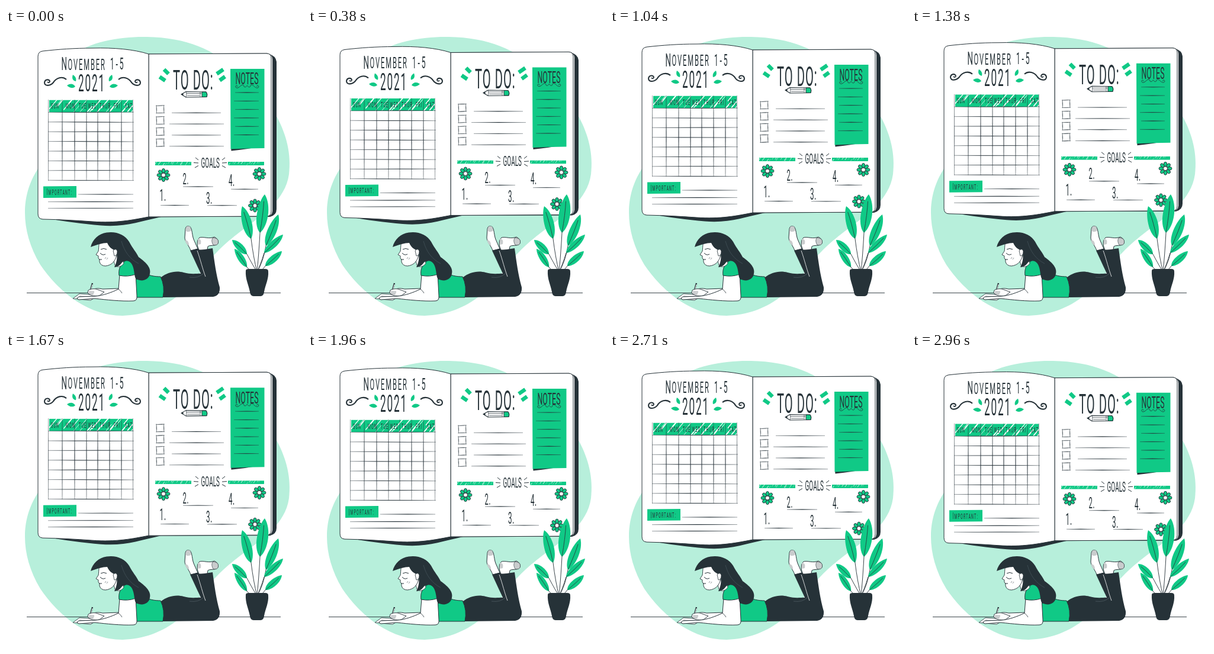
An HTML page with a canvas that plays this animation: 500 px wide and 500 px high, repeating every 3000 ms.

```html
<!DOCTYPE html>
<html lang="en">
<head>
<meta charset="utf-8">
<title>Weekly planner</title>
<style>
html, body { margin: 0; width: 100%; height: 100%; overflow: hidden; background: #fff; }
canvas { display: block; width: 500px; height: 500px; }
</style>
</head>
<body>
<canvas id="stage"></canvas>
<script>
const canvas = document.getElementById('stage');
const ctx = canvas.getContext('2d');
const dpr = window.devicePixelRatio || 1;
canvas.width = canvas.height = 500 * dpr;

const GREEN = '#10c986', PALE = '#b7efdb', DARK = '#263238', WHITE = '#fff', GREY = '#c9cccd';
const LOOP = 3000, LIFT = 10, CONDENSE = 0.43;

function shape(d, fill, stroke, width = 1) {
  const p = new Path2D(d);
  if (fill) { ctx.fillStyle = fill; ctx.fill(p); }
  if (stroke) { ctx.strokeStyle = stroke; ctx.lineWidth = width; ctx.stroke(p); }
}
const line = (d, width = 1, color = DARK) => shape(d, null, color, width);

// Pen line that thins out at both ends
function pen(x1, y1, x2, y2, width = 0.9) {
  const mx = (x1 + x2) / 2, my = (y1 + y2) / 2;
  const a = Math.atan2(y2 - y1, x2 - x1);
  const nx = -Math.sin(a) * width, ny = Math.cos(a) * width;
  shape(`M${x1} ${y1}Q${mx + nx} ${my + ny} ${x2} ${y2}Q${mx - nx} ${my - ny} ${x1} ${y1}`, DARK, DARK, 0.25);
}

// Tall narrow lettering, x and track in stage pixels
function label(str, x, y, size, track = 0) {
  ctx.save();
  ctx.translate(x, y);
  ctx.scale(CONDENSE, 1);
  ctx.font = `400 ${size}px Roboto, "Open Sans", sans-serif`;
  ctx.letterSpacing = track / CONDENSE + 'px';
  ctx.fillStyle = DARK;
  ctx.fillText(str, 0, 0);
  ctx.restore();
}

function mirror(axis, draw) {
  draw();
  ctx.save();
  ctx.translate(2 * axis, 0);
  ctx.scale(-1, 1);
  draw();
  ctx.restore();
}

function randomFrom(seed) {
  return () => (seed = (seed * 16807) % 2147483647) / 2147483647;
}

// Marker block with slanted white gaps
function marker(x, y, w, h, gaps, width, seed) {
  const rnd = randomFrom(seed);
  ctx.save();
  ctx.beginPath();
  ctx.rect(x, y, w, h);
  ctx.clip();
  ctx.fillStyle = GREEN;
  ctx.fillRect(x, y, w, h);
  for (let i = 0; i < gaps; i++) {
    const gx = x + w * (i + rnd() * 0.8) / gaps;
    const gy = y + h * (rnd() < 0.6 ? 0 : 0.5);
    const len = h * (0.4 + rnd() * 0.5);
    line(`M${gx} ${gy + len}L${gx + len * 0.9} ${gy - 1}`, width * (0.5 + rnd()), WHITE);
  }
  ctx.restore();
}

function flower(x, y, r) {
  ctx.save();
  ctx.translate(x, y);
  ctx.strokeStyle = DARK;
  ctx.lineWidth = 0.9;
  for (let i = 0; i < 8; i++) {
    ctx.beginPath();
    ctx.ellipse(0, -r * 0.66, r * 0.25, r * 0.34, 0, 0, 7);
    ctx.fillStyle = GREEN;
    ctx.fill();
    ctx.stroke();
    ctx.rotate(Math.PI / 4);
  }
  ctx.beginPath();
  ctx.arc(0, 0, r * 0.31, 0, 7);
  ctx.fillStyle = WHITE;
  ctx.fill();
  ctx.stroke();
  ctx.restore();
}

function background() {
  shape(`M238 15C305 16 352 37 389 72C424 106 443 125 458 151C474 181 482 213 478 247
    C472 291 431 317 401 340C372 362 354 378 335 404C308 441 270 483 197 486
    C135 486 86 441 58 400C40 370 32 340 32 312C32 280 42 256 55 236
    C78 190 82 82 114 47C139 22 198 14 238 15Z`, PALE);
}

function pages() {
  shape(`M68 321C100 327 130 331 160 333.5C200 337 225 327 262 319L446 319
    Q457 316 457 306V57Q456 47 444 44H250L68 300Z`, DARK);
  shape('M241 44L441 43Q450.5 45 450.5 53V309Q450 318 441 318L241 319Z', WHITE, DARK, 0.8);
  shape('M241 44L440 43Q448 43 448 51V310Q448 318 440 318L241 319Z', WHITE, DARK);
  shape(`M241 44C216 36 182 33 146 34C115 34 89 36 62 39Q54 40 54 48V314
    Q54 322.5 62 323C91 323.5 117 325 146 327C186 330 215 324 241 319Z`, WHITE, DARK);
}

function titles() {
  label('N', 93.5, 71.5, 31);
  label('OVEMBER', 104.5, 71, 26, 1.9);
  label('1-5', 176, 70.5, 28, 2.8);
  label('2021', 122, 107.5, 40, 1.8);
  mirror(146, () => {
    line('M74 91C74 86 66 86 65 92C65 99 75 98 80 92C85 84 95 81 102 87', 2.1);
    line('M70 91Q72 93.5 74 91', 1.8);
    shape('M118 90C112 89 111 84 113 79C118 82 119 86 118 90Z', GREEN);
    shape('M117 99C112 103 107 101 103 97C109 93 114 94 117 99Z', GREEN);
  });
}

function calendar() {
  marker(73, 121.5, 141, 21, 22, 1.2, 71);
  [71.5, 95, 116, 136, 155, 175, 195, 214.5].forEach((x, i) =>
    pen(x, 121, x, 258, i % 7 ? 0.8 : 0.4));
  for (let i = 0; i < 8; i++) {
    const y = 142.4 + i * 16.4;
    pen(71, y, 216, y + (i % 2 ? 0.4 : -0.3), 0.8);
  }
  const days = [['SUN', 76], ['MON', 101], ['TUE', 123], ['WED', 138.5], ['THUR', 158], ['FRI', 182], ['SAT', 201]];
  for (const [day, x] of days) label(day, x, 136.5, 12.5, 1.2);
  shape('M63 267.5L119 267V286.5L63 287Z', GREEN);
  label('I', 68.5, 282.5, 14);
  label('MPORTANT:', 71.5, 282, 12.5, 1.2);
  pen(122, 281, 215, 281);
  pen(71, 293.6, 215, 293.4);
  pen(71, 304.5, 215, 304.3);
}

function pencil() {
  shape('M296 112L304 107.5L338 108Q341 112 339 116.5L304 117Z', WHITE, DARK, 1.1);
  shape('M331 108H338Q341 112 339 116.5H331Z', GREEN, DARK, 1);
  shape('M295.5 112L299.5 110V114.5Z', DARK);
  line('M304 107.5Q306 112 304 117M305 110.5H330M306 114H327M328 108V116.5', 0.7);
}

function todo() {
  label('TO DO:', 282, 104.5, 47, 1);
  line('M267 70L274.5 77.5M259.5 82.5L269 89', 6.5, GREEN);
  line('M367 70L356 77.5M370 82L361 88.5', 6.5, GREEN);
  pencil();
  for (let i = 0; i < 4; i++) {
    const y = 130.8 + i * 18.8;
    pen(253, y + 0.5, 268, y, 0.7);
    pen(254, y - 0.5, 254.5, y + 13.5, 0.7);
    pen(253, y + 13, 268, y + 12.5, 0.7);
    pen(266.5, y - 0.5, 267, y + 13.5, 0.7);
    pen(i % 2 ? 276 : 280, y + 12.5, i % 2 ? 368 : 363, y + 12.5);
  }
}

function notes() {
  shape('M380 200L430 200Q407 205 380.5 207.5Z', DARK);
  shape('M379 69H436.5V203Q407 203 379.5 204.5Z', GREEN);
  label('NOTES', 387.5, 95.5, 28.5, 0.1);
  mirror(407.3, () =>
    line('M391 99C391 96 387 97 388 100C390 103 394 100 396 98C399 95 402 96 402 99C404 101 406 99 407.3 97', 0.8));
  for (let i = 0; i < 6; i++) pen(i % 2 ? 385 : 387, 109 + i * 14.3, 427, 109 + i * 14.3, 0.8);
}

function goals() {
  marker(252, 226, 61, 6, 13, 0.6, 19);
  marker(375, 226, 61, 6, 13, 0.6, 43);
  label('GOALS', 329.5, 236, 23, 0.1);
  mirror(345, () => line('M320 219L325 223M317 227.5L325 228M319 236L325 232.5', 1));
  label('1.', 259.5, 292.5, 28, 0.8);
  label('2.', 298.5, 264.5, 26, 0.8);
  label('3.', 338, 297, 27, 0.8);
  label('4.', 376, 267, 27, 0.6);
  pen(261, 299.5, 309, 299.5);
  pen(299, 268, 350, 268);
  pen(340, 299.8, 390, 299.8);
  pen(380, 272.2, 426, 272.2);
  flower(266, 248.5, 11);
  flower(428, 246.5, 11);
  flower(420.5, 300, 11);
}

function legs() {
  shape('M303 339Q304 333 311 335.5C315 341 314 349 317 357L324 373L312 376C309 367 302 361 302 354Z', WHITE, DARK);
  shape('M303.5 339Q305 333 311 335.5L313 342Q308 346 304 343Z', GREY);
  shape('M302.5 358Q309 358 309 368Q303 364 302.5 358Z', GREY);
  shape('M311 376L331 371C335 385 344 400 350 423L337 431C327 411 319 393 311 376Z', DARK);
  shape('M326 375C322 367 322 358 327 354C334 352 342 357 352 353Q360 357 358 364C354 369 345 366 341 369L340 375Z', WHITE, DARK);
  shape('M349 354.5Q360 354 358.5 363Q357 368 350 366.5Q346 360 349 354.5Z', GREY, DARK, 0.6);
  shape('M324 356Q331 356 329 365L324.5 366Z', GREY);
  shape(`M262 421C272 413 287 409 300 413C314 417 325 414 333 415L323 376L349 372
    C352 394 355 417 361 438Q362 452 350 454L263 455Z`, DARK);
  line('M323 376C329 393 332 407 337 420', 0.8, WHITE);
  line('M333 415Q325 423 310 421', 0.5, '#65737a');
}

function woman() {
  legs();
  shape('M196 395C204 390 215 394 220 403C232 417 248 420 261 420Q269 436 265 455H215L196 417Z', GREEN, DARK);
  // far arm and writing hand
  shape('M191 440L163 441C155 439 149 440 142 443Q137 447 140 450L150 452L190 455Z', WHITE, DARK);
  shape('M113 457L124 449L157 451L143 460Z', WHITE, DARK, 0.8);
  line('M119 456L139 457M124 453L143 454', 0.6);
  line('M146 431L141 449', 2.4);
  line('M146 433L143 443', 0.9, WHITE);
  shape('M139 443C144 440 151 440 155 442L166 446L158 452C148 454 140 451 138 447Z', WHITE, DARK, 0.9);
  line('M140 446L149 446M140 449L148 449', 0.7);
  // near arm
  shape(`M192 416L190 441C178 447 163 452 151 453L123 454Q118 457 123 459L150 457
    C169 459 195 462 215 461Q222 461 221 452L219 414Z`, WHITE, DARK);
  line('M190 441Q194 444 196 448', 0.8);
  shape('M202 393C191 400 190 410 191 418Q206 421 219 416C222 403 214 389 202 393Z', GREEN, DARK);
  // head
  shape('M181 389L184 401Q191 407 199 398L195 380Z', WHITE, DARK, 0.8);
  shape(`M158 362C156 368 157 373 156 377L152 383L156 385L156 389L158 391L158 395
    Q160 402 168 402C177 401 183 396 186 387L188 371L174 358Z`, WHITE, DARK, 0.9);
  line('M159 380Q163 385 168 382M160 374Q165 371 170 374M157 391L162 391', 1);
  line('M167 390L169 387M170 391L172 388', 0.5);
  shape(`M143 370C146 357 157 347 170 345.5C186 343 201 349 208 361C215 374 219 377 224 387
    C234 394 246 404 243 415C242 424 232 429 222 425C216 424 218 412 214 402
    C211 393 202 391 196 396C192 402 187 404 183 404C188 395 189 383 185 376
    C179 374 174 370 171 363C163 363 154 366 143 370Z`, DARK);
  shape('M181 376Q186 371 188 377Q188 385 183 385Z', WHITE, DARK, 0.8);
  line('M195 360C200 378 209 390 224 398', 0.5, '#53626a');
}

// Leaf from base to tip with half width w; bend steers its stem
function leaf(bx, by, tx, ty, w, bend) {
  const dx = tx - bx, dy = ty - by, len = Math.hypot(dx, dy);
  const nx = -dy / len * w, ny = dx / len * w;
  const at = (k, side) => `${bx + dx * k + nx * side} ${by + dy * k + ny * side}`;
  line(`M424 412Q${bx + bend} ${(by + 412) / 2 + 4} ${bx} ${by}`, 0.9);
  shape(`M${bx} ${by}C${at(0.2, 1.2)} ${at(0.75, 1.3)} ${tx} ${ty}C${at(0.8, -0.9)} ${at(0.2, -1.4)} ${bx} ${by}Z`, GREEN);
  line(`M${bx} ${by}Q${at(0.5, 0.15)} ${at(0.82, 0)}`, 0.8);
}

function plant() {
  leaf(429, 346, 437, 281, 10.5, -2);
  leaf(414, 356, 399, 301, 9, 4);
  leaf(439, 368, 460, 315, 8.5, -4);
  leaf(407, 382, 382, 358, 6.5, 10);
  leaf(436, 380, 468, 349, 6.5, -6);
  leaf(407, 404, 386, 373, 6, 6);
  leaf(438, 402, 466, 377, 6.5, -6);
  shape(`M405 410Q405 407 410 407H438Q443 407 443 411C444 424 438 434 436 446
    Q435 453 430 453H418Q413 453 412 446C410 434 404 424 405 410Z`, DARK);
}

function draw(now) {
  const phase = (now % LOOP) / LOOP;
  const rise = LIFT * (1 - Math.abs(1 - 2 * phase));
  ctx.setTransform(dpr, 0, 0, dpr, 0, 0);
  ctx.fillStyle = WHITE;
  ctx.fillRect(0, 0, 500, 500);
  ctx.lineJoin = 'round';
  background();
  ctx.save();
  ctx.translate(0, -rise);
  pages();
  titles();
  calendar();
  todo();
  notes();
  goals();
  ctx.restore();
  line('M35 447.5H464', 0.9);
  woman();
  plant();
}

const start = performance.now();
function tick() {
  draw(performance.now() - start);
  requestAnimationFrame(tick);
}
tick();
</script>
</body>
</html>
```
